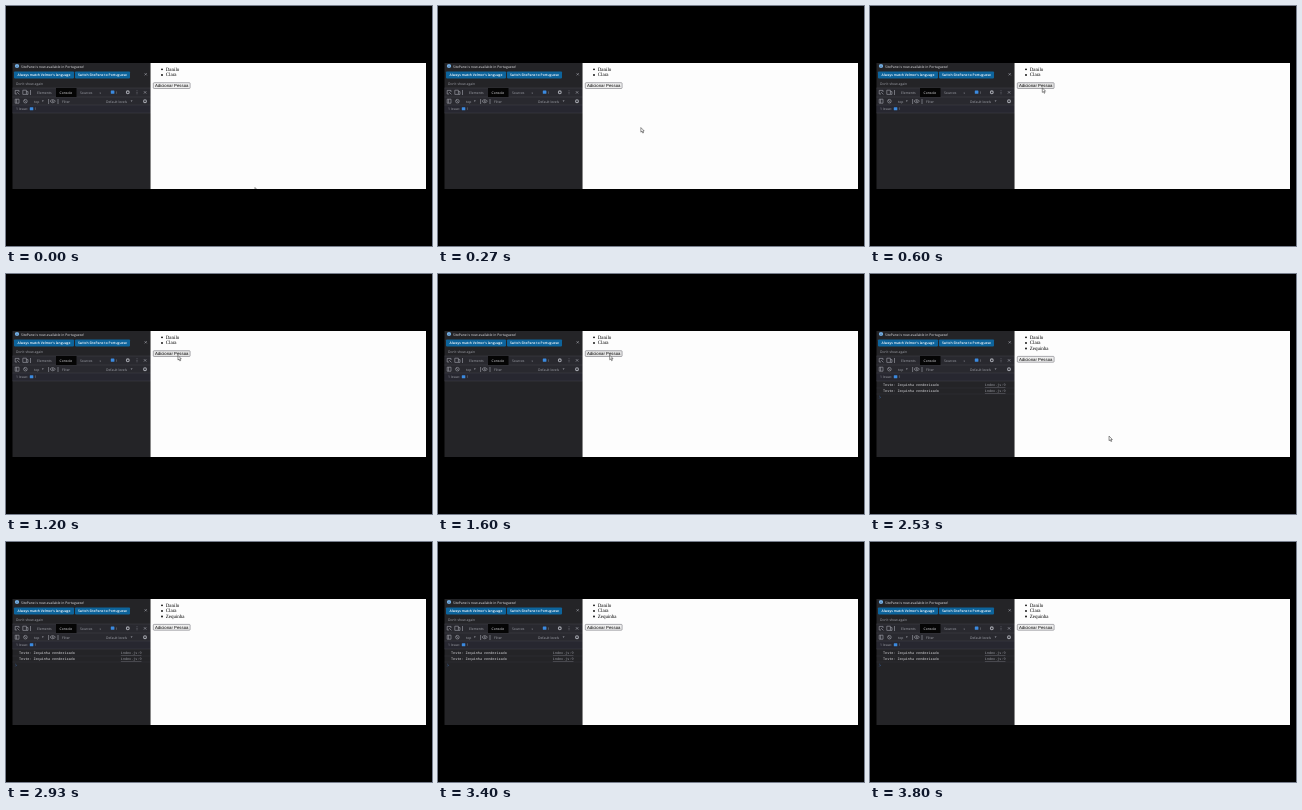
Recreate the animation shown at these times as an HTML page. Size 426 by 240 pixels, loop 3.87 s.

```html
<!DOCTYPE html>
<html lang="pt">
<head>
<meta charset="utf-8">
<title>Lista de pessoas</title>
<style>
  html, body { margin: 0; width: 100%; height: 100%; overflow: hidden; background: #000; }
  svg { display: block; width: 100%; height: 100%; }
  text { text-rendering: geometricPrecision; white-space: pre; }
  .ui { font: 3.4px "Open Sans", "Noto Sans", sans-serif; fill: #a3a5ad; }
  .ui .bright { fill: #e6e6ea; }
  .ui .bold { fill: #fff; font-weight: 600; font-size: 3.35px; }
  .log { font: 3.45px "Noto Sans Mono", "DejaVu Sans Mono", monospace; fill: #dcdce0; }
  .log .link { fill: #9b9da5; text-decoration: underline; }
  .list { font: 5px "Liberation Serif", serif; fill: #000; }
  .button { font: 4.3px "Liberation Sans", sans-serif; fill: #000; }
  .icon { fill: none; stroke: #a3a5ad; stroke-width: .6; }
</style>
</head>
<body>
<svg viewBox="0 0 426 240">
  <defs><clipPath id="pageClip"><path d="M145 57H420V183H145Z"/></clipPath></defs>
  <rect width="426" height="240"/>

  <rect x="6.5" y="57" width="138" height="126" fill="#242427"/>
  <rect x="6.5" y="82" width="138" height="17" fill="#29292f"/>
  <rect x="6.5" y="99" width="138" height="8" fill="#272730"/>
  <path d="M6.5 82H144.5M6.5 91H144.5M6.5 99H144.5M6.5 107H144.5" stroke="#414149" stroke-width=".5"/>

  <g class="ui">
    <circle cx="11" cy="60" r="2.1" fill="#79b7ee"/>
    <path d="M11 59.7V61.3M11 58.7V59.1" stroke="#223" stroke-width=".5"/>
    <text class="bright" x="15" y="61.5">SitePane is now available in Portuguese!</text>
    <rect x="8" y="65.4" width="60" height="7" rx=".8" fill="#0d649c"/>
    <rect x="69" y="65.4" width="55" height="7" rx=".8" fill="#0d649c"/>
    <text class="bold" x="38" y="70.2" text-anchor="middle">Always match Velmor's language</text>
    <text class="bold" x="96.5" y="70.2" text-anchor="middle">Switch SitePane to Portuguese</text>
    <text x="10" y="78.8">Don't show again</text>

    <rect x="50" y="82" width="20.5" height="9" fill="#050505"/>
    <text x="31" y="87.8">Elements</text>
    <text class="bright" x="53.5" y="87.8">Console</text>
    <text x="74" y="87.8">Sources</text>
    <text x="93.5" y="87.6">»</text>
    <rect x="104.8" y="84.6" width="3.6" height="3.2" rx=".5" fill="#3b8ae0"/>
    <text x="109.8" y="87.8">1</text>

    <text x="28" y="96.6">top</text>
    <text x="56" y="96.6">Filter</text>
    <text x="100" y="96.6">Default levels</text>
    <path d="M35.8 94.4h2l-1 1.3ZM124.6 94.4h2l-1 1.3Z" fill="#a3a5ad"/>

    <text x="10" y="104.2">1 Issue:</text>
    <rect x="23.8" y="101.2" width="3.5" height="3.1" rx=".5" fill="#3b8ae0"/>
    <text x="28.5" y="104.2">1</text>
  </g>

  <g class="icon">
    <path d="M138.6 67.2l2.2 2.2m0-2.2l-2.2 2.2M137.9 85.2l2.4 2.4m0-2.4l-2.4 2.4"/>
    <path d="M11 88H9.2V84.4H13V86M11.2 86.2l2.2 2.2"/>
    <path d="M16.8 84.2H20.4V88.4H16.8ZM20.4 85.6H22V88.4H20.4"/>
    <path d="M24.5 84V89M42.6 93V98M52 93V98"/>
    <path d="M9.2 93.2H13V97.2H9.2ZM10.6 93.2V97.2"/>
    <circle cx="19.4" cy="95.2" r="1.8"/><path d="M18.2 94l2.4 2.4"/>
    <path d="M44 95.2q2.7-3.2 5.4 0q-2.7 3.2-5.4 0Z"/><circle cx="46.7" cy="95.2" r=".6"/>
    <circle cx="121.8" cy="86.3" r="1.4" stroke-width="1.1"/>
    <circle cx="139" cy="95.2" r="1.4" stroke-width="1.1"/>
    <path d="M131 84.5v.7m0 .8v.7m0 .8v.7"/>
  </g>

  <g class="log" id="logs">
    <text x="13" y="112.1">Teste: Zequinha renderizado</text>
    <text class="link" x="135.5" y="112.1" text-anchor="end">index.js:9</text>
    <text x="13" y="118.3">Teste: Zequinha renderizado</text>
    <text class="link" x="135.5" y="118.3" text-anchor="end">index.js:9</text>
    <path d="M6.5 114H144.5M6.5 120H144.5" stroke="#36363d" stroke-width=".4"/>
    <path d="M9.3 122l1.2 1.2l-1.2 1.2" fill="none" stroke="#3f73b8" stroke-width=".5"/>
  </g>

  <rect x="144.5" y="57" width="275.5" height="126" fill="#fdfdfd"/>
  <g class="list">
    <circle cx="156" cy="63.3" r=".9"/><text x="159.7" y="64.7">Danilo</text>
    <circle cx="156" cy="69" r=".9"/><text x="159.7" y="70.4">Clara</text>
    <g id="added"><circle cx="156" cy="74.5" r=".9"/><text x="159.7" y="75.9">Zequinha</text></g>
  </g>
  <g class="button" id="button">
    <rect id="face" x="147.3" y="76.7" width="36.8" height="5.8" rx=".8" stroke="#76767c" stroke-width=".6"/>
    <text x="165.7" y="81.1" text-anchor="middle">Adicionar Pessoa</text>
  </g>
  <g clip-path="url(#pageClip)">
    <path id="cursor" d="M0 0V4.6L1.1 3.7L1.9 5.5L2.7 5.1L1.9 3.4H3.3Z"
          fill="#fff" stroke="#222" stroke-width=".5"/>
  </g>
</svg>
<script>
  const LOOP = 3870, STEP = LOOP / 58;
  const ADD_AT = 1660, HOVER_AT = 400;
  // time, x, y of the pointer tip
  const path = [
    [0, 249, 181.5], [470, 172.3, 81.8], [2130, 171.5, 81],
    [2530, 239, 162], [2680, 251, 186], [LOOP, 251, 186]
  ];
  const [logs, added, button, face, cursor] =
    ['logs', 'added', 'button', 'face', 'cursor'].map(id => document.getElementById(id));
  const ease = p => p * p * (3 - 2 * p);
  const show = (node, on) => node.setAttribute('visibility', on ? 'visible' : 'hidden');

  function pointerAt(t) {
    const i = path.findIndex((key, n) => n > 0 && t <= key[0]);
    const [t0, x0, y0] = path[i - 1], [t1, x1, y1] = path[i];
    const p = ease((t - t0) / (t1 - t0));
    return [x0 + (x1 - x0) * p, y0 + (y1 - y0) * p];
  }

  function draw(now) {
    const t = Math.floor((now % LOOP + 5) / STEP) * STEP % LOOP;
    const isAdded = t >= ADD_AT;
    const hovered = t >= HOVER_AT && t < 2200;
    show(logs, isAdded);
    show(added, isAdded);
    button.setAttribute('transform', `translate(0 ${isAdded ? 5.7 : 0})`);
    face.setAttribute('fill', hovered ? '#e5e5e5' : '#efefef');
    cursor.setAttribute('transform', `translate(${pointerAt(t)})`);
    requestAnimationFrame(() => draw(performance.now()));
  }
  draw(0);
</script>
</body>
</html>
```
